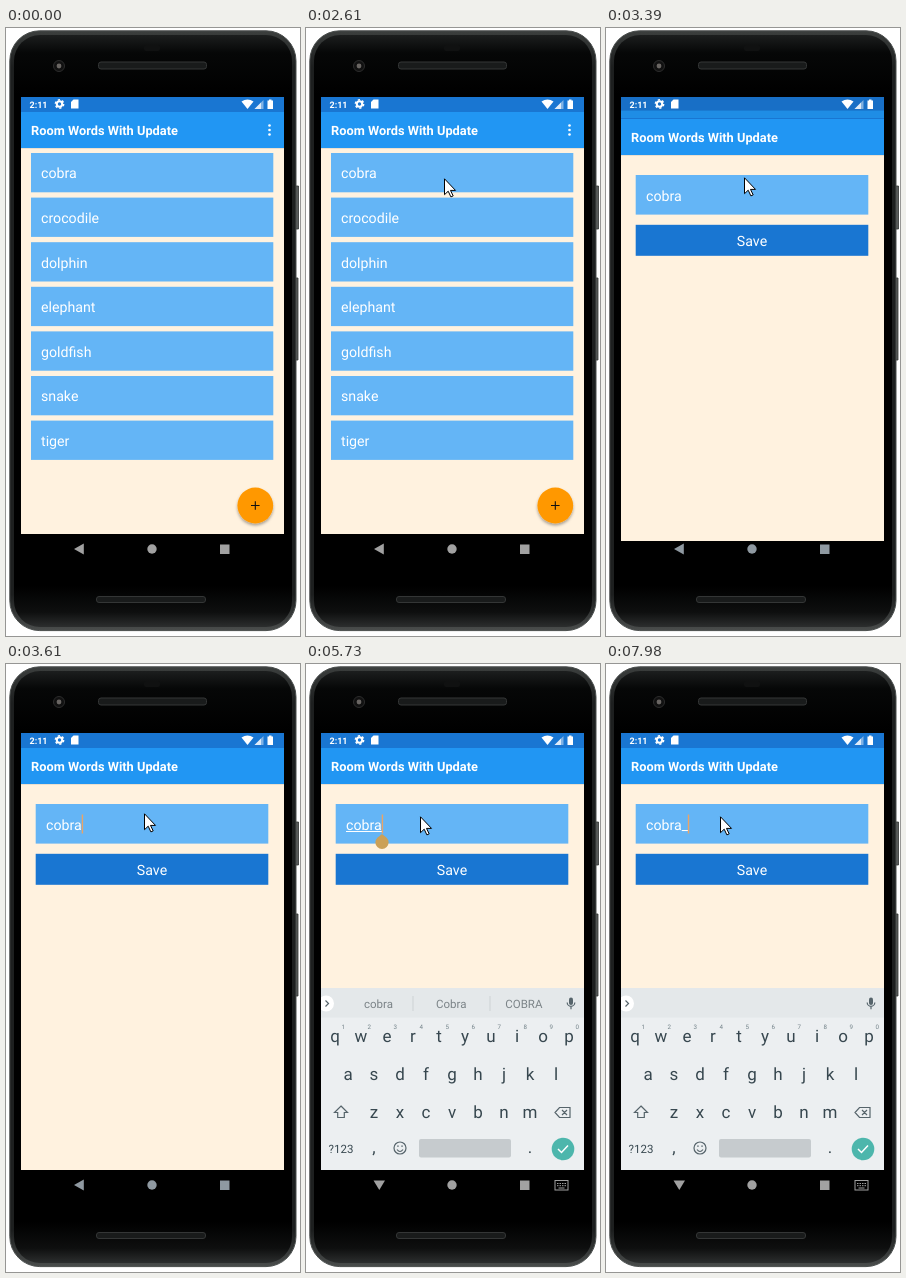
An HTML page for the animation above (8000 ms loop, 294 by 608 pixels).

```html
<!DOCTYPE html>
<html lang="en">
<head>
<meta charset="utf-8">
<title>Room Words With Update</title>
<style>
html, body { margin: 0; width: 100%; height: 100%; overflow: hidden; background: #fff; }
svg { display: block; width: 294px; height: 608px; }
text { font-family: Roboto, sans-serif; text-rendering: geometricPrecision; }
.word { font-size: 14.2px; fill: #fff; }
.title { font-size: 12.8px; font-weight: 700; fill: #fff; }
.key { font-size: 17px; fill: #37474f; text-anchor: middle; }
.hint { font-size: 6.2px; fill: #718087; text-anchor: middle; }
.suggestion { font-size: 11.5px; fill: #7b8387; text-anchor: middle; }
.line { fill: none; stroke: #56646b; stroke-width: 1.2; }
</style>
</head>
<body>
<svg viewBox="0 0 294 608">
  <defs>
    <clipPath id="screen"><rect x="15" y="69" width="263" height="460"/></clipPath>
    <clipPath id="reveal"><rect id="revealBox" x="15" width="263" height="460"/></clipPath>
    <filter id="shadow" x="-30%" y="-30%" width="160%" height="170%">
      <feDropShadow dx="0" dy="2" stdDeviation="1.6" flood-opacity=".35"/>
    </filter>
    <linearGradient id="rim" x2="0" y2="1">
      <stop stop-color="#3c3f3e"/><stop offset=".06" stop-color="#1d1f1f"/>
      <stop offset=".94" stop-color="#1d1f1f"/><stop offset="1" stop-color="#4a4d4c"/>
    </linearGradient>
    <linearGradient id="glass" x2="0" y2="1">
      <stop stop-color="#1c1e1e"/><stop offset=".03" stop-color="#060707"/><stop offset=".1" stop-color="#000"/>
      <stop offset=".93" stop-color="#000"/><stop offset=".975" stop-color="#0e0f0f"/><stop offset="1" stop-color="#2c2e2e"/>
    </linearGradient>
    <g id="appBar">
      <rect x="15" y="69" width="263" height="16" fill="#1976d2"/>
      <rect x="15" y="84" width="263" height="36" fill="#2196f3"/>
      <rect x="15" y="120" width="263" height="1" opacity=".08"/>
      <text class="title" x="25" y="106.5">Room Words With Update</text>
    </g>
  </defs>

  <!-- phone -->
  <path d="M288 158h4.5v43H288zM288 250h4v82h-4z" fill="#5a5d5c" stroke="#303332" stroke-width=".8"/>
  <rect x="3.8" y="2.8" width="286.2" height="599.8" rx="30" fill="url(#rim)" stroke="#4a4e4d"/>
  <rect x="8" y="7" width="278" height="592" rx="26" fill="url(#glass)"/>
  <rect x="138" y="17" width="16" height="6" rx="2" fill="#101111"/>
  <g fill="#191b1b" stroke="#343636">
    <rect x="92.5" y="34" width="108" height="7" rx="2.5"/>
    <rect x="90.5" y="568.5" width="109" height="6" rx="2.5"/>
  </g>
  <circle cx="53" cy="38" r="5.5" fill="#111" stroke="#2c2c2c"/>
  <circle cx="53" cy="38" r="2.4" fill="#6a6663"/>

  <g clip-path="url(#screen)">
    <g id="list">
      <rect x="15" y="118" width="263" height="388" fill="#fff2df"/>
      <use href="#appBar"/>
      <g fill="#fff"><circle cx="263.5" cy="97.5" r="1.3"/><circle cx="263.5" cy="102" r="1.3"/><circle cx="263.5" cy="106.5" r="1.3"/></g>
      <g id="cards"></g>
      <circle cx="249.3" cy="477.5" r="17.9" fill="#ff9800" filter="url(#shadow)"/>
      <path d="M245 477.5h8.6M249.3 473.2v8.6" stroke="#111" stroke-width="1.1"/>
    </g>
    <rect id="dim" x="15" y="69" width="263" height="437"/>

    <g id="editor" clip-path="url(#reveal)">
      <g id="editorBody">
        <rect x="15" y="84" width="263" height="422" fill="#fff2df"/>
        <use href="#appBar"/>
        <rect x="29.7" y="140" width="232.6" height="39.6" fill="#64b5f6"/>
        <rect x="29.7" y="189.8" width="232.6" height="31" fill="#1976d2"/>
        <text class="word" x="146" y="211" text-anchor="middle">Save</text>
        <text class="word" x="40" y="165.5" id="input">cobra</text>
        <path id="underline" d="M40 167.5h36" stroke="#fff"/>
        <path id="handle" d="M76 170l4.6 3.7a6.6 6.6 0 1 1-9.2 0z" fill="#cba057"/>
        <rect id="caret" y="150.5" width="1.4" height="19" fill="#e9a468"/>
      </g>
    </g>

    <!-- status bar -->
    <text x="23.5" y="79.6" font-size="9" font-weight="700" fill="#fff">2:11</text>
    <g fill="none" stroke="#fff">
      <circle cx="53.5" cy="76" r="2.7" stroke-width="2"/>
      <circle cx="53.5" cy="76" r="4.2" stroke-width="1.4" stroke-dasharray="2.2"/>
    </g>
    <g fill="#fff">
      <path d="M67.5 71.5h5v9h-7.5v-6.5z"/>
      <path d="M235.5 73.6q6-4 12 0l-6 7.4z"/>
      <path d="M257.5 72v9h-9z" opacity=".45"/><path d="M255 74.5v6.5h-6.5z" opacity=".75"/>
      <path d="M261.5 72.5h1.5v-1h2.5v1h1.5v8.5h-5.5z"/>
    </g>

    <g id="keyboard">
      <rect x="15" y="324" width="263" height="182" fill="#eceff1"/>
      <rect x="15" y="324" width="263" height="29.5" fill="#e4e8ea"/>
      <circle cx="20" cy="339.5" r="8" fill="#fff"/>
      <path class="line" d="M19.5 336.5l3 3-3 3"/>
      <g id="suggestions"><path d="M107 332v15M184 332v15" stroke="#cdd2d4"/></g>
      <rect x="263" y="333.5" width="4" height="7.5" rx="2" fill="#56646b"/>
      <path class="line" d="M261.2 338.5a3.8 3.8 0 0 0 7.6 0M265 342.3v3"/>
      <g id="keys"></g>
      <path class="line" d="M35 442l6.5 6.5h-3.2v5h-6.6v-5h-3.2z"/>
      <path class="line" d="M253.5 443.5h10.5v10h-10.5l-4.5-5zM256 446l5 5M261 446l-5 5"/>
      <text class="key" x="35" y="488.5" style="font-size:11.5px">?123</text>
      <text class="key" x="68" y="489">,</text>
      <text class="key" x="224" y="489">.</text>
      <circle class="line" cx="94" cy="484" r="6"/>
      <path class="line" d="M91 485.5q3 4 6 0M91.2 482.2h1.5M95.3 482.2h1.5"/>
      <rect x="113" y="475" width="92" height="18.5" rx="2" fill="#c6cbce"/>
      <circle cx="257" cy="485" r="11.3" fill="#4db6ac"/>
      <path d="M252 485l3.5 3.5 6.5-7" fill="none" stroke="#fff" stroke-width="1.5"/>
    </g>

    <!-- navigation bar: translucent icons over whatever lies below -->
    <g id="nav" opacity=".63">
      <path id="back" d="M68 521l9.8-5.5v11z"/>
      <path id="down" d="M67.5 516.5h11.5l-5.7 9.5z"/>
      <circle cx="146" cy="521" r="4.7"/>
      <rect x="214" y="516.5" width="9.5" height="9.5"/>
      <g id="switcher" fill="none" stroke="#fff">
        <rect x="249" y="516.5" width="13" height="9.5"/>
        <path d="M251 519.5h9M251 521.7h9" stroke-dasharray="1.5 1"/>
        <path d="M252.5 524h6"/>
      </g>
    </g>
  </g>

  <circle id="click" r="12" fill="#ff0" fill-opacity=".47"/>
  <path id="pointer" d="M.5 .8v15.9l3.7-3.5 2.7 5.7 2.3-1-2.7-5.5h5z" fill="#fff" stroke="#000" stroke-linejoin="round"/>
</svg>

<script>
const LOOP = 8000, STEP = 76.5, MOVE_START = 610;
const $ = id => document.getElementById(id);
const show = (id, on) => { $(id).style.display = on ? '' : 'none'; };
const shift = (id, x, y) => $(id).setAttribute('transform', `translate(${x} ${y})`);
const text = (cls, x, y, s) => `<text class="${cls}" x="${x}" y="${y}">${s}</text>`;

$('cards').innerHTML = ['cobra', 'crocodile', 'dolphin', 'elephant', 'goldfish', 'snake', 'tiger']
  .map((word, i) => {
    const y = 125 + i * 44.6;
    return `<rect x="25" y="${y}" width="242.3" height="39.3" fill="#64b5f6"/>` + text('word', 35, y + 25.4, word);
  }).join('');

$('suggestions').innerHTML += ['cobra', 'Cobra', 'COBRA']
  .map((word, i) => text('suggestion', 72.5 + i * 72.7, 343.7, word)).join('');

$('keys').innerHTML = [['qwertyuiop', 29, 377.5], ['asdfghjkl', 42, 415.5], ['zxcvbnm', 68, 453.5]]
  .map(([letters, x, y]) => [...letters].map((c, i) => text('key', x + i * 26, y, c)).join('')).join('')
  + [...'1234567890'].map((c, i) => text('hint', 37.3 + i * 26, 364.5, c)).join('');

// Keyframes are [time, ...values].
const pointerPath = [[610, 247, 600], [1380, 180, 372], [1530, 168, 327], [2220, 144, 172], [2300, 142, 166],
  [2610, 138, 149], [3700, 138, 149], [3780, 137, 149], [3850, 137, 149], [4160, 114, 152]];
const openPoses = [[3310, 18, 259], [3390, 7, 90], [3465, 2, 69], [3540, 1, 69], [3610, 0, 69]];
const keyboardPoses = [[4790, 28, .3], [4880, 18, .75], [4950, 5, 1], [5030, 0, 1]];
const caretFlips = [3610, 3780, 4330, 5180, 5730, 6190, 6650, 7520, 7980];

function hold(keys, t) {
  return keys.findLast(k => k[0] <= t) || keys[0];
}

function tween(keys, t) {
  const i = keys.findIndex(k => k[0] > t);
  if (i < 1) return keys.at(i).slice(1);
  const a = keys[i - 1], b = keys[i], p = (t - a[0]) / (b[0] - a[0]);
  return a.slice(1).map((v, n) => v + (b[n + 1] - v) * p);
}

function draw(t) {
  const stepped = MOVE_START + Math.floor((t - MOVE_START) / STEP) * STEP;
  const [x, y] = tween(pointerPath, stepped).map(Math.round);
  shift('pointer', x, y);
  shift('click', x, y);
  show('pointer', t >= MOVE_START);
  show('click', (t >= 2840 && t < 2990) || (t >= 4480 && t < 4630));

  const opening = t >= 3310, typed = t >= 6970, keyboard = t >= 4790;
  const [, drop, top] = hold(openPoses, t);
  shift('list', 0, opening ? -1.4 : 0);
  $('dim').setAttribute('opacity', opening ? .06 : 0);
  show('editor', opening);
  $('revealBox').setAttribute('y', top);
  shift('editorBody', 0, drop);

  $('input').textContent = typed ? 'cobra_' : 'cobra';
  $('caret').setAttribute('x', typed ? 81.8 : 75.7);
  show('caret', caretFlips.filter(flip => flip <= t).length % 2);
  show('underline', keyboard && !typed);
  show('handle', keyboard && !typed);

  const [, rise, alpha] = hold(keyboardPoses, t);
  shift('keyboard', 0, rise);
  $('keyboard').setAttribute('opacity', alpha);
  show('keyboard', keyboard);
  show('suggestions', t < 7050);

  show('back', !keyboard);
  show('down', keyboard);
  show('switcher', keyboard);
  $('nav').setAttribute('fill', t >= 3390 && !keyboard ? '#e3f2ff' : '#fff');
}

function tick() {
  draw(performance.now() % LOOP);
  requestAnimationFrame(tick);
}
tick();
</script>
</body>
</html>
```
